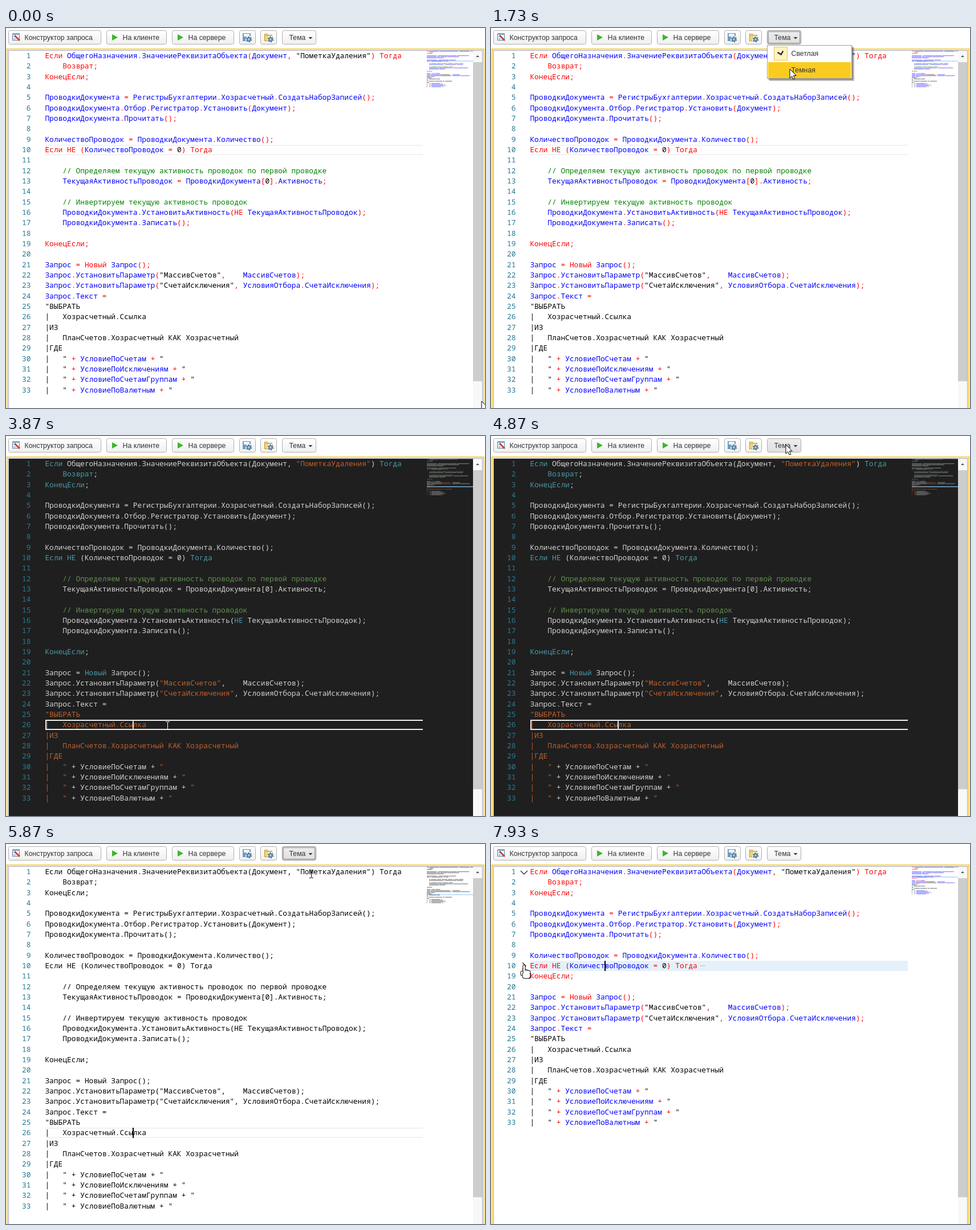
An HTML page with a canvas for the animation above (8 s loop, 840 by 667 pixels).

```html
<!DOCTYPE html>
<html lang="ru">
<head>
<meta charset="utf-8">
<title>Редактор кода: смена темы</title>
<style>
html, body { margin: 0; width: 840px; height: 667px; overflow: hidden; background: #fff; }
canvas { display: block; }
</style>
</head>
<body>
<canvas id="stage" width="840" height="667"></canvas>
<script>
const c = document.getElementById('stage').getContext('2d');
const LOOP = 8000, STEP = 200 / 3, CHAR = 7.72, ROW = 18.33, LEFT = 68.4, TOP = 40.1, MAP_ROW = 1.95;
const UI = '12.3px "Liberation Sans", Arial, sans-serif';
const MONO = CHAR / 0.6 + 'px "Noto Sans Mono", "DejaVu Sans Mono", monospace';

const CODE = `Если ОбщегоНазначения.ЗначениеРеквизитаОбъекта(Документ, "ПометкаУдаления") Тогда
    Возврат;
КонецЕсли;

ПроводкиДокумента = РегистрыБухгалтерии.Хозрасчетный.СоздатьНаборЗаписей();
ПроводкиДокумента.Отбор.Регистратор.Установить(Документ);
ПроводкиДокумента.Прочитать();

КоличествоПроводок = ПроводкиДокумента.Количество();
Если НЕ (КоличествоПроводок = 0) Тогда

    // Определяем текущую активность проводок по первой проводке
    ТекущаяАктивностьПроводок = ПроводкиДокумента[0].Активность;

    // Инвертируем текущую активность проводок
    ПроводкиДокумента.УстановитьАктивность(НЕ ТекущаяАктивностьПроводок);
    ПроводкиДокумента.Записать();

КонецЕсли;

Запрос = Новый Запрос();
Запрос.УстановитьПараметр("МассивСчетов",    МассивСчетов);
Запрос.УстановитьПараметр("СчетаИсключения", УсловияОтбора.СчетаИсключения);
Запрос.Текст =
"ВЫБРАТЬ
|   Хозрасчетный.Ссылка
|ИЗ
|   ПланСчетов.Хозрасчетный КАК Хозрасчетный
|ГДЕ
|   " + УсловиеПоСчетам + "
|   " + УсловиеПоИсключениям + "
|   " + УсловиеПоСчетамГруппам + "
|   " + УсловиеПоВалютным + "`;

const KEYWORDS = /^(Если|Тогда|КонецЕсли|Возврат|НЕ|Новый)$/;
const TOKEN = /\/\/.*|^\|[^"]*"?|"[^"]*"?|[А-Яа-я]+|\d+|\s+|./g;

function kindOf(s) {
  if (s.startsWith('//')) return 'comment';
  if (/^["|]/.test(s)) return 'string';
  if (KEYWORDS.test(s)) return 'keyword';
  if (/^[А-Я]/i.test(s)) return 'name';
  return /^\d/.test(s) ? 'digit' : 'sign';
}

const lines = CODE.split('\n').map((text, i) => ({
  number: i + 1,
  tokens: [...text.matchAll(TOKEN)].filter(m => m[0].trim())
    .map(m => ({ s: m[0], col: m.index, kind: kindOf(m[0]) }))
}));

const LIGHT = {
  bg: '#fff', border: '#eee', caret: '#000', map: '#c4e0fb', number: '#237893',
  comment: '#008000', string: '#000', keyword: '#f00', name: '#00f', digit: '#000', sign: '#f00'
};
const PLAIN = { ...LIGHT, comment: '#000', keyword: '#000', name: '#000', sign: '#000' };
const DARK = {
  bg: '#1f1f1f', border: '#eee', caret: '#ddd', map: '#6189a8', number: '#2b7a93',
  comment: '#619050', string: '#c3602c', keyword: '#4a9aa8', name: '#d4d4d4', digit: '#d4d4d4', sign: '#d4d4d4'
};

// Moments of the story
const OPEN_1 = 1070, PICK_DARK = 2130, OPEN_2 = 4930, PICK_LIGHT = 5870, COLORED = 5930, FOLD = 7930;

// Pointer moves: departure, arrival, x, y
const MOVES = [
  [0, 870, 518, 17], [1570, 1730, 524, 72], [2130, 2730, 470, 200], [2830, 3530, 226, 510],
  [3800, 3870, 283, 508], [4030, 4870, 517, 15], [5230, 5670, 535, 52],
  [5930, 6130, 500, 80], [6230, 6670, 200, 214], [6700, 7070, 50, 216], [7100, 7670, 58, 212]
];

// Text cursor: time, line, column
const CARETS = [[0, 10, 38], [PICK_DARK, 10, 38], [3330, 14, 0], [3670, 26, 20], [PICK_LIGHT, 26, 20], [6670, 10, 17]];

const within = (t, a, b) => t >= a && t < b;

function pointerAt(t) {
  let x = 834, y = 655;
  for (const [from, to, nextX, nextY] of MOVES) {
    const u = Math.min(1, Math.max(0, (t - from) / (to - from))), e = u * u * (3 - 2 * u);
    x += (nextX - x) * e;
    y += (nextY - y) * e;
  }
  return [Math.round(x), Math.round(y)];
}

function box(x, y, w, h, fill) {
  c.fillStyle = fill;
  c.fillRect(x, y, w, h);
}

function frame(x, y, w, h, color, width = 1) {
  c.strokeStyle = color;
  c.lineWidth = width;
  c.strokeRect(x + width / 2, y + width / 2, w - width, h - width);
}

function label(s, x, y) {
  c.font = UI;
  c.fillStyle = '#333';
  c.fillText(s, x, y);
}

function round(x, y, w, h, r, fill, stroke) {
  c.beginPath();
  c.roundRect(x, y, w, h, r);
  c.fillStyle = fill;
  c.fill();
  c.strokeStyle = stroke;
  c.lineWidth = 1;
  c.stroke();
}

function polygon(points, fill, stroke) {
  c.beginPath();
  points.forEach(p => c.lineTo(...p));
  c.closePath();
  c.fillStyle = fill;
  c.fill();
  if (!stroke) return;
  c.strokeStyle = stroke;
  c.lineWidth = 1;
  c.stroke();
}

const triangle = (x, y, r, h, fill) => polygon([[x - r, y], [x + r, y], [x, y + h]], fill);

// An open angle pointing down, or turned by the given angle
function chevron(x, y, r, turn, color, width) {
  c.save();
  c.translate(x, y);
  c.rotate(turn);
  c.beginPath();
  c.moveTo(-r, -r / 2);
  c.lineTo(0, r / 2);
  c.lineTo(r, -r / 2);
  c.strokeStyle = color;
  c.lineWidth = width;
  c.stroke();
  c.restore();
}

function dotted(draw) {
  c.setLineDash([1, 1]);
  draw();
  c.setLineDash([]);
}

function button(x, w, state) {
  const g = c.createLinearGradient(0, 4, 0, 29);
  g.addColorStop(0, state ? '#eee' : '#fff');
  g.addColorStop(1, state ? '#dedede' : '#efefef');
  round(x + .5, 4.5, w - 1, 24, 3, g, state === 'focus' ? '#888' : '#b0b0b0');
  if (state === 'focus') dotted(() => frame(x + 2, 6, w - 4, 21, '#333'));
}

function gear(x, y) {
  for (const [color, width, dash] of [['#fff', 6, 0], ['#5b7f9c', 2, 0], ['#5b7f9c', 5, 1.57]]) {
    c.setLineDash(dash ? [dash] : []);
    c.beginPath();
    c.arc(x, y, 3, 0, 7);
    c.strokeStyle = color;
    c.lineWidth = width;
    c.stroke();
  }
  c.setLineDash([]);
}

function queryIcon(x, y) {
  frame(x, y, 13, 13, '#4f81a8');
  box(x, y, 13, 3, '#7ba7c9');
  for (const row of [5, 9]) box(x + 2, y + row, 4, 2, '#a9c3d8');
  c.beginPath();
  c.moveTo(x + 4, y + 4);
  c.lineTo(x + 13, y + 13);
  c.strokeStyle = '#d2452d';
  c.lineWidth = 3;
  c.stroke();
}

function toolbar(state) {
  button(4, 163);
  button(176, 106);
  button(291, 109);
  button(409, 29);
  button(446, 29);
  button(484, 60, state);
  queryIcon(11, 9);
  label('Конструктор запроса', 32.5, 21);
  ['На клиенте', 'На сервере'].forEach((name, i) => {
    const x = 186 + i * 115;
    polygon([[x, 11], [x + 10, 16.5], [x, 22]], '#3db52c');
    label(name, x + 18.5, 21);
  });
  box(415, 9, 14, 14, '#6b9cc4');
  box(417, 10, 10, 5, '#eef5fa');
  gear(426, 20);
  frame(453, 10, 6, 4, '#c69a31');
  box(453, 12, 14, 11, '#f5d36a');
  frame(453, 12, 14, 11, '#c69a31');
  gear(464, 20);
  label('Тема', 496.5, 21);
  triangle(534, 16, 3.5, 3.5, '#333');
}

function mapToken(s, col, y) {
  [...s].forEach((ch, k) => {
    if (ch !== ' ' && col + k < 81) c.fillRect(738 + col + k, y, .9, /[.,;]/.test(ch) ? .5 : 1.3);
  });
}

function currentLine(y, folded, theme, dark) {
  if (folded) return box(69, y, 662, 18, '#e4f1fb');
  const b = dark ? 2 : 1.5;
  box(69, y, 662, b, theme.border);
  box(69, y + 18 - b, 662, b, theme.border);
  box(69, y, b, 18, theme.border);
}

function editor(t, theme, dark, menuOpen, mouseX) {
  const folded = t >= FOLD;
  const shown = lines.filter(l => !folded || l.number < 11 || l.number > 18);
  const [since, current, column] = CARETS.findLast(k => k[0] <= t);
  const rowTop = Math.floor(TOP + ROW * (current - 1));

  frame(1, 36, 838, 700, '#f6cf4a', 2);
  frame(4, 39, 832, 700, '#a5a5a5');
  box(5, 40, 830, 640, theme.bg);
  currentLine(rowTop, folded, theme, dark);
  box(738, Math.floor(TOP + (current - 1) * MAP_ROW), 81, 2, theme.map);

  c.font = MONO;
  shown.forEach((line, i) => {
    const y = Math.round(TOP + ROW * i + 12.9);
    c.textAlign = 'right';
    c.fillStyle = theme.number;
    c.fillText(line.number, 43.5, y);
    c.textAlign = 'left';
    for (const { s, col, kind } of line.tokens) {
      c.fillStyle = theme[kind];
      c.fillText(s, LEFT + col * CHAR, y);
      c.globalAlpha = .5;
      mapToken(s, col, TOP + i * MAP_ROW);
      c.globalAlpha = 1;
    }
  });

  if (folded) for (let k = 0; k < 3; k++) box(367 + k * 3, 213, 1.4, 1.4, '#999');
  if (mouseX < 68) {
    chevron(58, 50, 6, 0, '#333', 1.4);
    chevron(58, 214, 6, folded ? -Math.PI / 2 : 0, '#333', 1.4);
  }
  const lit = Math.floor((t - since) / 500) % 2 === 0;
  if (lit && since && !menuOpen) box(Math.round(LEFT + column * CHAR) - 1, rowTop, 2, 18, theme.caret);

  box(819, 40, 16, 640, '#f8f8f8');
  box(819, 60, 16, 560, '#cdcdcd');
  triangle(827, 51, 3, -3, '#505050');
}

function menu(active, checked) {
  for (const d of [2, 4]) box(484 + d, 30 + d, 149, 59, 'rgba(0,0,0,.25)');
  box(484, 30, 149, 59, '#fff');
  frame(484, 30, 149, 59, '#a0a0a0');
  ['Светлая', 'Темная'].forEach((name, i) => {
    const y = 31 + i * 29;
    if (i === active) box(486, y, 145, 28, '#fbcb20');
    if (i === checked) {
      box(496, y + 2, 24, 24, '#fff1c0');
      frame(496, y + 2, 24, 24, '#eac54c');
      chevron(508, y + 13, 5, -.25, '#333', 2.5);
    }
    label(name, 526.5, y + 18);
  });
}

function arrow(flip) {
  if (flip) c.scale(-1, 1);
  polygon([[0, 0], [0, 16], [3.7, 12.6], [6.2, 18], [8.8, 17], [6.4, 11.5], [11.3, 11.5]], '#fff', '#000');
}

function beam(color) {
  box(0, -6, 1, 13, color);
  for (const y of [-7, 7]) for (const x of [-3, 1]) box(x, y, 3, 1, color);
}

function hand() {
  round(-6, 11, 5, 8, 2, '#fff', '#000');
  for (let k = 3; k >= 0; k--) round(-2 + k * 3, k ? 7 + k : 0, 4, 14, 2, '#fff', '#000');
  round(-3, 13, 14, 11, 4, '#fff', '#000');
  box(-1, 11, 11, 7, '#fff');
}

function pointer(x, y, dark, menuOpen) {
  const inCode = !menuOpen && y > 38 && x < 738;
  c.save();
  c.translate(x, y);
  if (!inCode || x < 52) arrow(inCode);
  else if (x < 66) hand();
  else beam(dark ? '#fff' : '#000');
  c.restore();
}

function draw(t) {
  const dark = within(t, PICK_DARK, PICK_LIGHT);
  const theme = dark ? DARK : within(t, PICK_LIGHT, COLORED) ? PLAIN : LIGHT;
  const menuOpen = within(t, OPEN_1, PICK_DARK) || within(t, OPEN_2, PICK_LIGHT);
  const focus = within(t, OPEN_1 + 130, PICK_DARK) || within(t, OPEN_2 + 130, COLORED);
  const [x, y] = pointerAt(t);
  const hover = within(x, 484, 544) && within(y, 4, 29);

  box(0, 0, 840, 667, '#fff');
  toolbar(focus ? 'focus' : hover ? 'hover' : '');
  editor(t, theme, dark, menuOpen, x);
  if (menuOpen) menu(!dark && y > 59 ? 1 : 0, dark ? 1 : 0);
  pointer(x, y, dark, menuOpen);
}

// The picture advances fifteen times a second
function tick(now) {
  draw(Math.floor((now % LOOP + 5) / STEP) * STEP % LOOP + 5);
  requestAnimationFrame(tick);
}
requestAnimationFrame(tick);
</script>
</body>
</html>
```
